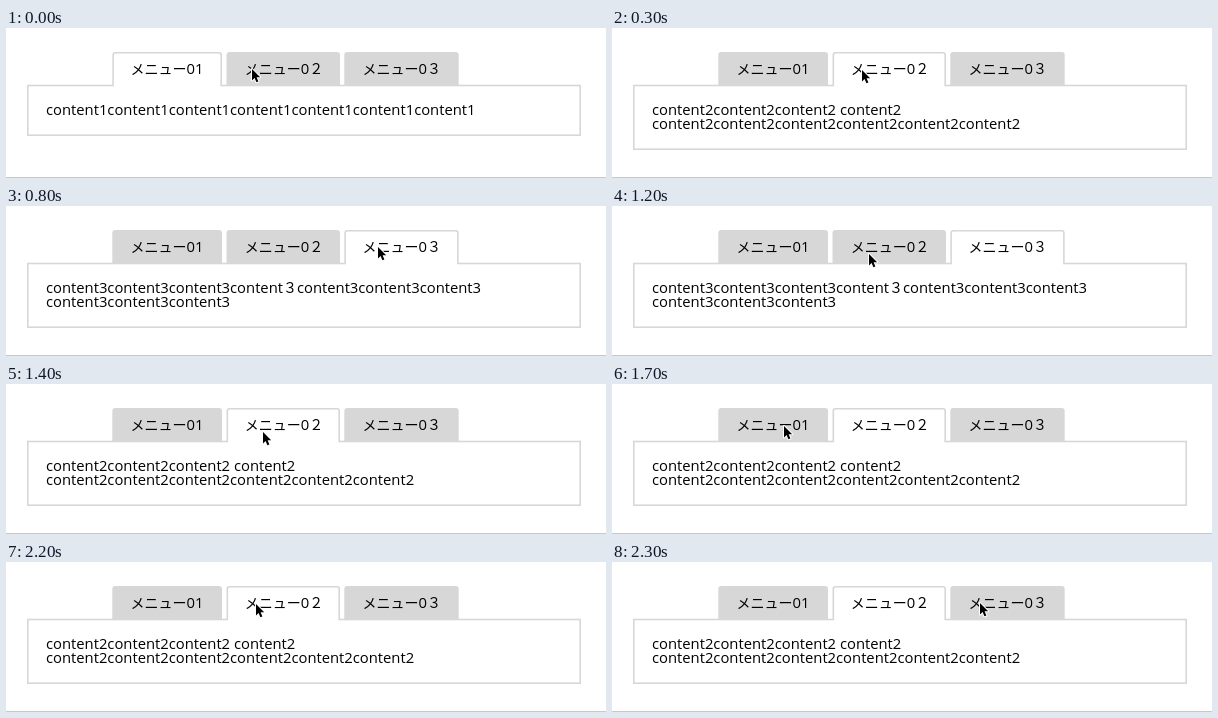
Animation, 600 px wide and 150 px high, one loop 2.4 s. Source, as an HTML page with a canvas:

```html
<!DOCTYPE html>
<html lang="ja">
<head>
<meta charset="utf-8">
<title>Tabs</title>
<style>
html, body { margin: 0; width: 100%; height: 100%; overflow: hidden; background: #fff; }
canvas { display: block; }
</style>
</head>
<body>
<canvas id="stage" width="600" height="150"></canvas>
<script>
const ctx = document.getElementById('stage').getContext('2d');
const LOOP = 2400;
const TICK = 100;
const GREY = '#d7d7d7';
const LINE = 1.6;
const LATIN = '14.8px "Open Sans", sans-serif';
const KANA = '14px "Noto Sans CJK JP", "Noto Sans CJK", sans-serif';

const tabs = [
  { x: 106.3, w: 109.7, label: 'メニュー01' },
  { x: 220.5, w: 113.5, label: 'メニュー0２' },
  { x: 338.3, w: 114.4, label: 'メニュー0３' }
];

const word = n => 'content' + n;
const panels = [
  [word(1).repeat(7)],
  [word(2).repeat(3) + ' ' + word(2), word(2).repeat(6)],
  [word(3).repeat(3) + word('３') + word(3).repeat(3), word(3).repeat(3)]
];

const clicks = [300, 800, 1400, 1900, 2200];
const home = { x: 246, y: 41 };
const moves = [
  { from: 0, to: 100, x: 247, y: 42 },
  { from: 200, to: 300, x: 250, y: 42 },
  { from: 300, to: 500, x: 372, y: 41 },
  { from: 900, to: 1200, x: 257, y: 48 },
  { from: 1400, to: 1700, x: 172, y: 42 },
  { from: 1800, to: 1900, x: 247, y: 42 },
  { from: 2100, to: 2200, x: 250, y: 42 },
  { from: 2200, to: 2400, x: 372, y: 41 }
];

const easeOut = p => 1 - (1 - p) ** 5;

// Each click steps through the tabs and back: 0 1 2 1 0 1
function openTab(t) {
  const n = clicks.filter(c => c <= t).length;
  return 2 - Math.abs(2 - n % 4);
}

function pointerAt(t) {
  let { x, y } = home;
  for (const m of moves) {
    const p = easeOut(Math.min(1, Math.max(0, (t - m.from) / (m.to - m.from))));
    x += (m.x - x) * p;
    y += (m.y - y) * p;
  }
  return [Math.round(x), Math.round(y)];
}

function rect(x, y, w, h, color) {
  ctx.fillStyle = color;
  ctx.fillRect(x, y, w, h);
}

// Latin and full-width runs use different faces
function text(str, x, y) {
  ctx.fillStyle = '#000';
  for (const run of str.match(/[\x20-\x7e]+|[^\x20-\x7e]+/g)) {
    ctx.font = run.charCodeAt(0) < 127 ? LATIN : KANA;
    ctx.fillText(run, x, y);
    x += ctx.measureText(run).width;
  }
}

function roundTop(x, y, w, h, r, color) {
  ctx.fillStyle = color;
  ctx.beginPath();
  ctx.roundRect(x, y, w, h, [r, r, 0, 0]);
  ctx.fill();
}

function drawPanel(lines) {
  const top = 56.7;
  const h = 37.3 + 14 * lines.length;
  rect(21, top, 554, h, GREY);
  rect(21 + LINE, top + LINE, 554 - 2 * LINE, h - 2 * LINE, '#fff');
  lines.forEach((line, i) => text(line, 40, 87 + 14 * i));
}

function drawTab({ x, w, label }, open) {
  roundTop(x, 24, w, 33, 3, GREY);
  if (open) roundTop(x + LINE, 24 + LINE, w - 2 * LINE, 35 - LINE, 1.5, '#fff');
  text(label, x + 18.2, 46);
}

function drawPointer(x, y) {
  const arrow = new Path2D('M0 0V11.6L2.6 9.1L4.4 13.3L6.4 12.5L4.6 8.3H8.2Z');
  ctx.save();
  ctx.translate(x, y);
  ctx.lineWidth = 2;
  ctx.lineJoin = 'round';
  ctx.strokeStyle = '#fff';
  ctx.stroke(arrow);
  ctx.fillStyle = '#000';
  ctx.fill(arrow);
  ctx.restore();
}

function draw(now) {
  const t = Math.floor(now % LOOP / TICK) * TICK;
  const open = openTab(t);
  rect(0, 0, 600, 150, '#fff');
  rect(0, 149, 600, 1, '#c8c8c8');
  drawPanel(panels[open]);
  tabs.forEach((tab, i) => drawTab(tab, i === open));
  drawPointer(...pointerAt(t));
}

const start = performance.now();
function loop() {
  draw(performance.now() - start);
  requestAnimationFrame(loop);
}
loop();
</script>
</body>
</html>
```
